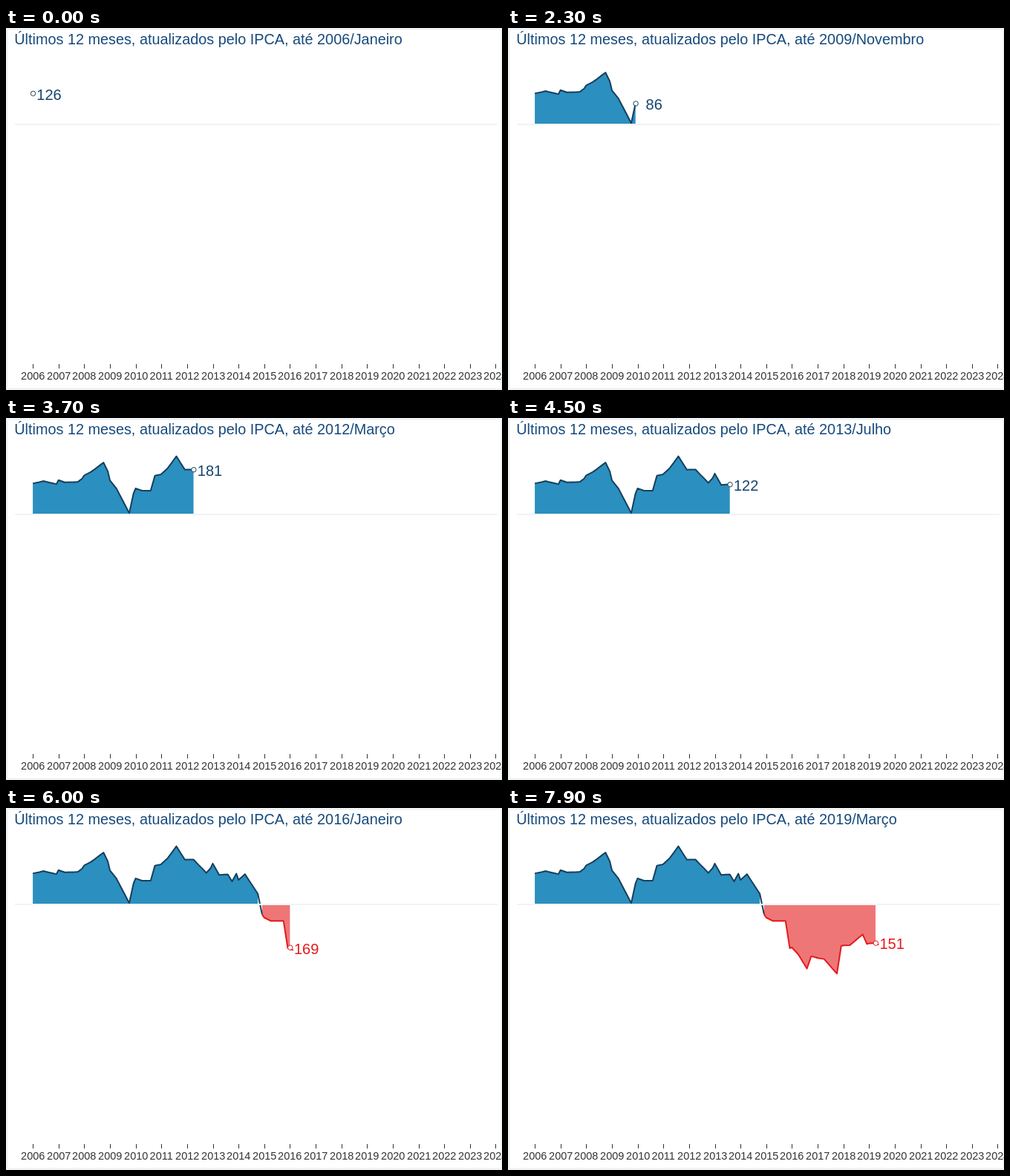
An HTML page with a canvas for the animation above (8 s loop, 668 by 488 pixels).

```html
<!DOCTYPE html>
<html lang="pt-BR">
<head>
<meta charset="utf-8">
<title>Últimos 12 meses, atualizados pelo IPCA</title>
<style>
html, body { margin: 0; width: 100%; height: 100%; overflow: hidden; background: #fff; }
canvas { display: block; }
</style>
</head>
<body>
<canvas id="chart" width="668" height="488"></canvas>
<script>
const ctx = document.getElementById('chart').getContext('2d');
const FONT = '"Liberation Sans", Arial, sans-serif';
const STEP = 100, COUNT = 80;
const YEAR = 34.63, LEFT = 36.1, ZERO = 130.8, SCALE = 0.3387;
const NAVY = '#17456f', LINE = '#163f5c', BLUE = '#2b8fbf', RED = '#e41a1c', PINK = '#ee7677';
const PALE = '#f0f4f7', INK = '#333';
const months = ['Janeiro', 'Março', 'Maio', 'Julho', 'Setembro', 'Novembro'];

// Turning points of the series (step: value); steps between them are interpolated
const keys = Object.entries({
  0: 126, 2: 135, 5: 123, 6: 139, 7: 130, 10: 132, 16: 209, 18: 138, 22: 8,
  23: 86, 24: 106, 25: 97, 27: 97, 28: 157, 30: 163, 33: 234, 35: 180, 37: 181,
  40: 128, 42: 165, 43: 120, 45: 122, 46: 94, 47: 125, 48: 100, 49: 123, 52: 45,
  53: -37, 55: -63, 58: -63, 59: -172, 60: -169, 63: -253, 64: -204, 67: -215,
  70: -273, 71: -163, 73: -160, 76: -117, 77: -155, 79: -151
}).map(([step, v]) => [Number(step), v]);

function valueAt(n) {
  const i = Math.max(1, keys.findIndex(k => k[0] >= n));
  const [n0, v0] = keys[i - 1], [n1, v1] = keys[i];
  return Math.round(v0 + (v1 - v0) * (n - n0) / (n1 - n0));
}

// January sits on the year tick, other months at their end
function timeX(n) {
  const m = n % 6;
  return LEFT + YEAR * (Math.floor(n / 6) + (m ? 2 * m + 1 : 0) / 12);
}

const points = Array.from({ length: COUNT }, (_, n) => {
  const v = valueAt(n);
  return { v, x: timeX(n), y: ZERO - SCALE * v };
});
const turn = points.findIndex(p => p.v < 0);

function rect(color, x, y, w, h) {
  ctx.fillStyle = color;
  ctx.fillRect(x, y, w, h);
}

function text(str, x, y, size, color, align) {
  ctx.font = size + 'px ' + FONT;
  ctx.textAlign = align;
  ctx.fillStyle = color;
  ctx.fillText(str, x, y);
}

function trace(list) {
  ctx.beginPath();
  list.forEach(p => ctx.lineTo(p.x, p.y));
}

function area(list, color, base) {
  if (list.length < 2) return;
  trace(list);
  ctx.lineTo(list[list.length - 1].x, base);
  ctx.lineTo(list[0].x, base);
  ctx.fillStyle = color;
  ctx.fill();
}

function line(list, color) {
  if (list.length < 2) return;
  trace(list);
  ctx.strokeStyle = color;
  ctx.lineWidth = 2;
  ctx.lineJoin = 'round';
  ctx.stroke();
}

function axis() {
  for (let i = 0; i <= 18; i++) {
    const x = Math.round(LEFT + YEAR * i);
    rect(INK, x, 453, 1, 6);
    text(2006 + i, x + 0.2, 474, 14.5, INK, 'center');
  }
}

function marker(p) {
  const color = p.v < 0 ? RED : NAVY;
  const label = String(p.v);
  // Labels are padded to four characters, then centred
  const pad = 3 * (4 - label.length);
  text(label, p.x + 18.9 + pad, Math.round(p.y + 8.5), 20, color, 'center');
  ctx.beginPath();
  ctx.arc(p.x + 0.4, p.y + 0.2, 3.2, 0, Math.PI * 2);
  ctx.fillStyle = '#fff';
  ctx.fill();
  ctx.strokeStyle = p.v < 0 ? RED : LINE;
  ctx.lineWidth = 1;
  ctx.stroke();
}

function draw(n) {
  const shown = points.slice(0, n + 1);
  rect(PALE, 0, 0, 668, 488);
  rect('#fff', 3, 3, 663, 482);
  area(shown.slice(0, turn), BLUE, 130);
  area(shown.slice(turn), PINK, 130);
  line(shown.slice(0, turn + 1), LINE);
  line(shown.slice(turn), RED);
  rect(PALE, 12, 129, 650, 2);
  axis();
  marker(shown[n]);
  const date = 2006 + Math.floor(n / 6) + '/' + months[n % 6];
  text('Últimos 12 meses, atualizados pelo IPCA, até ' + date, 11.3, 22, 19.83, '#174a7c', 'left');
}

const start = performance.now();
function tick(now) {
  draw(Math.floor(Math.max(0, now - start) / STEP) % COUNT);
  requestAnimationFrame(tick);
}
draw(0);
requestAnimationFrame(tick);
</script>
</body>
</html>
```
